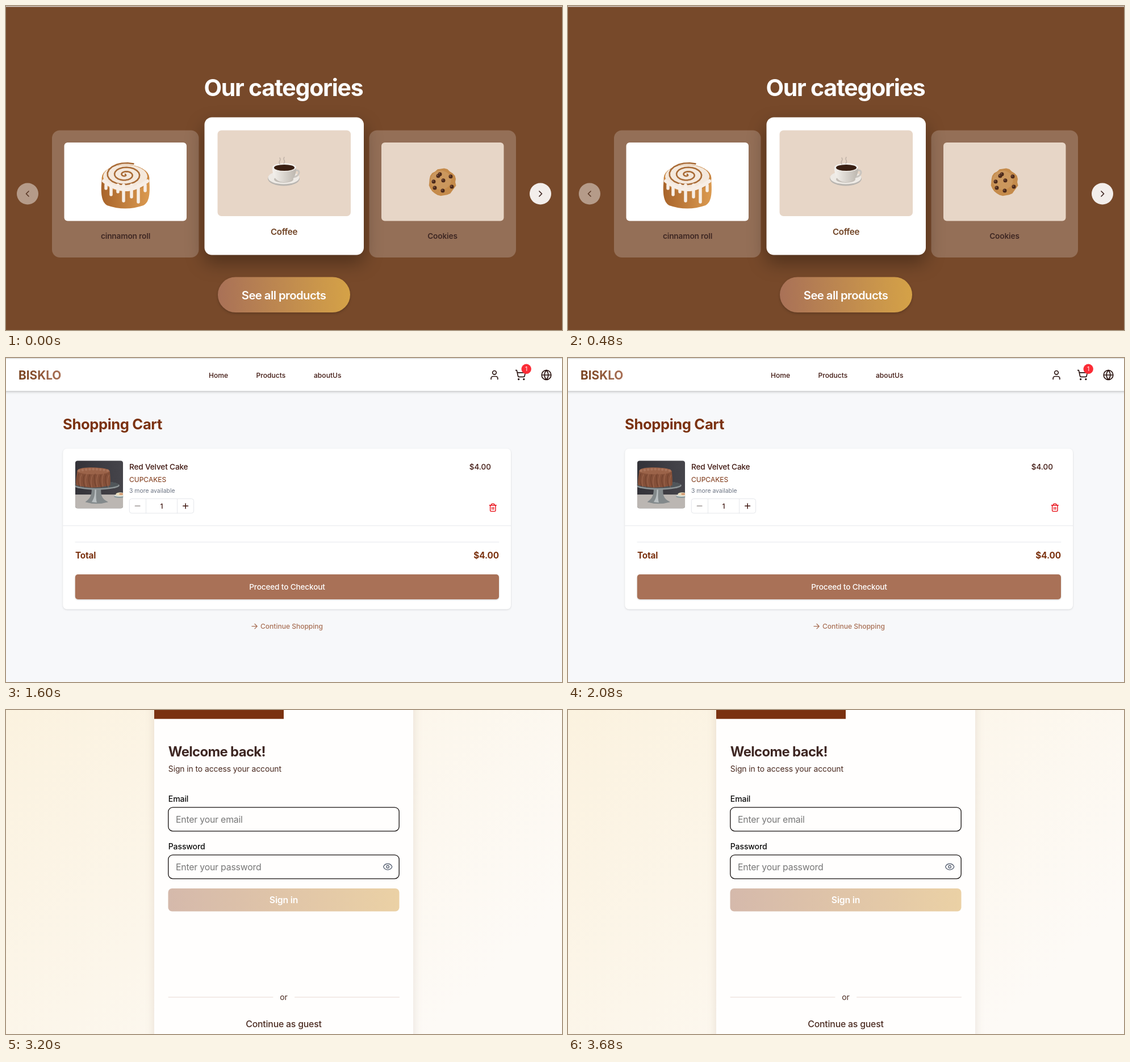
Recreate the animation shown at these times as an HTML page. Size 979 by 572 pixels, loop 4 s.

```html
<!DOCTYPE html>
<html lang="en">
<head>
<meta charset="utf-8">
<title>Bakery shop tour</title>
<style>
html,body{margin:0;width:100%;height:100%;overflow:hidden;background:#fff}
svg{display:block;width:100%;height:100%}
text{font-family:Inter,"DejaVu Sans",sans-serif;font-optical-sizing:none;white-space:pre}
.soft{filter:drop-shadow(0 2px 2px #0003)}
.card{filter:drop-shadow(0 4px 5px #0002)}
.deep{filter:drop-shadow(0 14px 16px #0005)}
.ic{fill:none;stroke-linecap:round;stroke-linejoin:round}
</style>
</head>
<body>
<svg id="stage" viewBox="0 0 979 572" preserveAspectRatio="none"></svg>
<script>
const HOLD = 800;
let seed = 7;
const rnd = () => (seed = (seed * 16807) % 2147483647) / 2147483647;
const span = (a, b) => a + (b - a) * rnd();
const n = v => +v.toFixed(2);
const times = (k, f) => Array.from({length: k}, (_, i) => f(i)).join('');

const rect = (x, y, w, h, r, fill, more = '') =>
  `<rect x="${x}" y="${y}" width="${w}" height="${h}" rx="${r}" fill="${fill}" ${more}/>`;
const oval = (x, y, rx, ry, fill, more = '') =>
  `<ellipse cx="${n(x)}" cy="${n(y)}" rx="${n(rx)}" ry="${n(ry)}" fill="${fill}" ${more}/>`;
const disc = (x, y, r, fill, more) => oval(x, y, r, r, fill, more);
const path = (d, fill, more = '') => `<path d="${d}" fill="${fill}" ${more}/>`;
const line = (d, stroke, w = 1, more = '') =>
  `<path class="ic" d="${d}" stroke="${stroke}" stroke-width="${w}" ${more}/>`;
const at = (x, y, body, k = 1) => `<g transform="translate(${x} ${y}) scale(${k})">${body}</g>`;
const box = (x, y, w, h, r, fill, stroke, sw = 1) =>
  rect(x, y, w, h, r, fill, `stroke="${stroke}" stroke-width="${sw}"`);
const text = (x, y, s, size, weight, fill, ls = -0.012, anchor = 'start', more = '') =>
  `<text x="${x}" y="${y}" font-size="${size}" font-weight="${weight}" fill="${fill}" ` +
  `letter-spacing="${n(ls * size)}" text-anchor="${anchor}" ${more}>${s}</text>`;
const mid = (x, y, s, size, weight, fill, ls) => text(x, y, s, size, weight, fill, ls, 'middle');
const end = (x, y, s, size, weight, fill, ls) => text(x, y, s, size, weight, fill, ls, 'end');
const grad = (id, a, b, more = '') =>
  `<linearGradient id="${id}" ${more}><stop stop-color="${a}"/><stop offset="1" stop-color="${b}"/></linearGradient>`;

const ring = (x, y, r) => `M${x - r} ${y}a${r} ${r} 0 1 0 ${2 * r} 0a${r} ${r} 0 1 0 ${-2 * r} 0`;
const ICONS = {
  user: 'M19 21v-2a4 4 0 0 0-4-4H9a4 4 0 0 0-4 4v2' + ring(12, 7, 4),
  cart: 'M2 2h2l2.7 12.4a2 2 0 0 0 2 1.6h9.8a2 2 0 0 0 2-1.6L22 7H5.1' + ring(8, 21, 1) + ring(19, 21, 1),
  globe: ring(12, 12, 10) + 'M12 2a14.5 14.5 0 0 0 0 20 14.5 14.5 0 0 0 0-20M2 12h20',
  trash: 'M3 6h18M19 6v14a2 2 0 0 1-2 2H7a2 2 0 0 1-2-2V6M8 6V4a2 2 0 0 1 2-2h4a2 2 0 0 1 2 2v2M10 11v6M14 11v6',
  eye: 'M2 12.3a1 1 0 0 1 0-.7 10.8 10.8 0 0 1 20 0 1 1 0 0 1 0 .7 10.8 10.8 0 0 1-20 0' + ring(12, 12, 3),
  search: ring(11, 11, 8) + 'M21 21l-4.3-4.3',
  cookie: 'M12 2a10 10 0 1 0 10 10 4 4 0 0 1-5-5 4 4 0 0 1-5-5M8.5 8.5v.01M16 15.5v.01M12 12v.01M11 17v.01M7 14v.01',
  truck: 'M14 18V6a2 2 0 0 0-2-2H4a2 2 0 0 0-2 2v11a1 1 0 0 0 1 1h2M15 18H9M19 18h2a1 1 0 0 0 1-1v-3.6a1 1 0 0 0-.2-.7l-3.5-4.3a1 1 0 0 0-.8-.4H14' + ring(17, 18, 2) + ring(7, 18, 2),
  star: 'M12 2l3.1 6.3 6.9 1-5 4.8 1.2 6.9L12 17.8 5.8 21 7 14.1 2 9.3l6.9-1z'
};
const icon = (name, x, y, size, color, sw = 2) =>
  at(n(x - size / 2), n(y - size / 2), line(ICONS[name], color, sw), size / 24);

// Irregular round biscuit with scattered chips
function cookie(x, y, r, fill, chip, chips = 12) {
  const edge = Array.from({length: 26}, (_, i) => {
    const a = i / 26 * 2 * Math.PI, d = r * span(.94, 1.04);
    return n(x + d * Math.cos(a)) + ' ' + n(y + d * Math.sin(a));
  });
  return path('M' + edge.join('L') + 'z', fill) +
    oval(x - r * .12, y - r * .15, r * .75, r * .7, '#fff', 'opacity=".1"') +
    times(chips, i => {
      const a = i * 2.4, d = r * .84 * Math.sqrt((i + .4) / chips);
      return oval(x + d * Math.cos(a), y + d * Math.sin(a), r * span(.07, .13), r * span(.06, .11), chip);
    });
}
const crumbs = (k, x, y, w, h, fill) =>
  times(k, () => oval(x + w * rnd(), y + h * rnd(), span(.8, 2.8), span(.7, 2.2), fill));

function bun() {
  let d = 'M210 297';
  for (let i = 1; i < 60; i++) {
    const a = i * .3, r = i * .6;
    d += `L${n(210 + r * Math.cos(a))} ${n(298 + r * .6 * Math.sin(a))}`;
  }
  const drips = [[176, 322], [185, 333], [197, 328], [207, 344], [221, 337], [233, 346], [245, 326]];
  return path('M169 304C166 330 168 346 178 352Q210 363 242 352C253 346 254 330 252 304z', 'url(#bun)') +
    oval(210.5, 304, 42, 24, '#c98540') + oval(210, 301, 39, 20.5, '#f4e8dc') +
    line(d, '#a96b36', 2.6) +
    line('M172 309Q210 339 249 309', '#f7eee6', 6) +
    drips.map(([x, y]) => line(`M${x} 316V${y}`, '#f7eee6', 5.5)).join('');
}
const cup = () =>
  oval(489, 305, 28, 12.5, '#b9b5b0') + oval(489, 303, 27.5, 11.5, '#eeeae5') +
  oval(489, 306, 17, 6, '#c3bdb6') +
  line('M508 291c11-5 11 10-2 11', '#c9c5bf', 3) +
  path('M469 285c0 18 8 26 21 26s21-8 21-26z', 'url(#china)') +
  oval(490, 285, 21, 7.5, '#f2efeb') + oval(490, 285.5, 18, 5.6, '#3a2013') +
  line('M482 279c-4-5 4-6 0-11M489 278c5-5-3-6 1-11', '#a59b92', 1.6, 'opacity=".55"');

function homePage() {
  const brown = '#3e2723';
  return rect(0, 0, 979, 572, 0, '#77492a') + rect(0, 0, 979, 1.5, 0, '#d8cfc9') +
    mid(488.5, 159, 'Our categories', 41, 700, '#fff', -.03) +
    [81, 639.5].map(x => rect(x, 219.5, 258.5, 224.5, 14, '#946f57')).join('') +
    rect(102.5, 241, 215.5, 138.5, 6, '#fff') + rect(661, 241, 215.5, 138.5, 6, '#e7d6c7') +
    bun() + cookie(768.5, 311, 24, '#c58b4b', '#8d5529', 0) +
    [[764, 297], [783, 301], [753, 310], [770, 308], [785, 319], [755, 321], [769, 326], [761, 300]]
      .map(([x, y]) => disc(x, y, 3.5, '#4d2a1b') + disc(x - 1, y - 1, 1.1, '#8a6250')).join('') +
    mid(210.5, 410.5, 'cinnamon roll', 13.7, 600, brown) + mid(768.5, 410.5, 'Cookies', 13.7, 600, brown) +
    rect(349.5, 196.5, 280.5, 243, 13, '#fff', 'class="deep"') +
    rect(372.5, 219.5, 234.5, 151.5, 7, '#e7d6c7') + cup() +
    mid(489.5, 403.5, 'Coffee', 15.1, 600, '#6f4223', -.02) +
    disc(38, 331.5, 19, '#b59b89') + line('M40 327l-4.5 4.5 4.5 4.5', '#5c3b29', 1.7) +
    disc(941, 331.5, 19, '#f3eeeb') + line('M939 327l4.5 4.5-4.5 4.5', brown, 1.7) +
    rect(373, 478.5, 233, 62.5, 31.2, 'url(#gold)', 'class="soft"') +
    mid(489, 517.5, 'See all products', 20.3, 600, '#fff', -.027);
}

// Photo scenes, drawn from their own top left corner
const cakePhoto = () =>
  rect(0, 0, 296, 296, 0, 'url(#dusk)') + rect(0, 210, 296, 86, 0, '#bbb6b2') +
  path('M102 170C104 225 84 240 62 256Q132 278 204 256C172 240 156 225 160 170z', '#83898b') +
  path('M122 178C122 225 112 240 102 256L134 260C126 230 130 200 130 178z', '#b9bfc1') +
  oval(132, 154, 142, 26, '#8e9597') + oval(132, 149, 136, 22, '#50565a') +
  path('M6 152C2 120 10 96 12 66Q24 44 112 43T214 66C217 96 220 130 216 154Q110 180 6 152z', '#855039') +
  path('M12 66Q30 84 112 85T214 66Q208 46 112 43T12 66z', '#9b6349') +
  times(12, i => line(`M${22 + i * 17} ${82 + i % 3 * 4}q-14 32 ${4 - i % 2 * 8} 76`, i % 2 ? '#ad745a' : '#633725', 4, 'opacity=".65"')) +
  times(9, i => disc(24 + i * 22, 62 - 9 * Math.sin(i * .39), 8, '#a9735a')) +
  oval(274, 222, 34, 9, '#85979b') + oval(274, 216, 32, 8, '#d9dbd6') +
  oval(278, 207, 27, 10, '#e8dcbb') + oval(284, 207, 12, 5, '#cf8c66');

const bowlPhoto = () =>
  rect(0, 0, 296, 167, 0, '#292b31') +
  path('M0 0H125Q70 60 88 167H0z', '#34373f') + line('M24 0Q70 60 24 167M62 0Q28 70 70 150', '#20232a', 9) +
  path('M150 0H296V110L230 60 120 64z', '#4a3a2d') + path('M140 0H282L240 48 176 46 132 28z', '#a48a6d') +
  line('M142 4Q84 46 76 100', '#765036', 6) +
  path('M40 112L108 62 94 112 118 167H78L72 130z', '#b79a7b') + path('M92 90L126 44 142 76 116 150z', '#8a6d50') +
  cookie(268, 112, 38, '#6d4329', '#472a1c', 7) + cookie(220, 72, 40, '#a97044', '#2d1d17', 14) +
  cookie(170, 88, 46, '#b98354', '#2d1d17', 15) + cookie(196, 128, 40, '#bd8858', '#2d1d17', 14) +
  cookie(146, 140, 36, '#ab7344', '#2d1d17', 14);

const chipPhoto = () =>
  rect(0, 0, 296, 167, 0, 'url(#steel)') + line('M150 0Q190 60 296 44M220 167L250 100', '#a9b1bb', 3) +
  cookie(24, 12, 38, '#a8794e', '#4a2b1c', 16) + cookie(300, 66, 26, '#74513a', '#332019', 10) +
  cookie(108, 66, 52, '#b38862', '#432517', 22) + cookie(88, 124, 46, '#a97b53', '#4d2d1d', 18) +
  cookie(184, 110, 40, '#b0825a', '#3a2117', 18) +
  path('M76 18L108 36 126 72 144 62 130 40 100 24z', '#3a2019') +
  disc(96, 66, 8, '#d9d3cf') + path('M150 130L164 100 176 142 160 160z', '#38221a') +
  crumbs(20, 10, 60, 270, 100, '#5d402d');

const boxPhoto = () =>
  rect(0, 0, 296, 70, 0, '#ddd0cf') + path('M0 0H108L152 70H0z', '#191514') +
  path('M104 0H121L164 70H144z', '#58b9b1') +
  disc(26, 12, 24, '#3a2a24') + crumbs(24, 6, 0, 38, 30, '#a99a8d') +
  disc(62, 64, 22, '#0d0b0b') + disc(94, 32, 30, '#382219') + disc(94, 32, 21, '#8a5735') +
  line(ring(94, 32, 15) + ring(88, 28, 6) + ring(100, 36, 6), '#d6ae74', 1.7) +
  cookie(177, 30, 31, '#3c2218', '#24140f', 6) + disc(177, 29, 20, '#955d3c') + disc(174, 26, 8, '#b07b57') +
  crumbs(46, 130, 2, 160, 62, '#71503f');

const shardPhoto = () =>
  rect(0, 0, 296, 70, 0, '#241916') +
  times(26, i => {
    const x = i % 9 * 36 + span(-18, 8), y = Math.floor(i / 9) * 25 + span(-14, 4), w = span(34, 64);
    return path(`M${n(x)} ${n(y + 18)}L${n(x + w)} ${n(y - 8)}l9 12L${n(x + 12)} ${n(y + 36)}z`, ['#45302a', '#5d453b', '#34231e', '#765d50'][i % 4]);
  });

const trufflePhoto = () =>
  rect(0, 0, 296, 70, 0, '#8b8076') +
  [[18, 8, 30], [82, 10, 27], [152, 8, 28], [222, 10, 26], [284, 12, 24], [50, 46, 29], [118, 40, 30], [202, 34, 28], [254, 54, 30], [14, 66, 28], [172, 70, 25]]
    .map(([x, y, r]) => disc(x + 2, y + 4, r, '#2e1b13') + disc(x, y, r, '#603825') +
      oval(x - r * .15, y - r * .25, r * .65, r * .5, '#8d5b40') + oval(x + r * .2, y - r * .4, r * .25, r * .14, '#bd9275')).join('') +
  crumbs(40, 0, 0, 296, 66, '#321e16');

function product(x, scene, title, lines, price) {
  const y = lines.length > 1 ? 437 : 420;
  return rect(x, 177, 295.5, 309.5, 13, '#fff', 'class="card"') +
    at(x, 177, `<g clip-path="url(#top)">${scene}</g>`) +
    text(x + 17.5, 378.5, title, 15.3, 600, '#0a0a0a', -.014) +
    lines.map((s, i) => text(x + 17.5, 405.3 + i * 17.5, s, 11.9, 400, '#4b5563', -.004)).join('') +
    text(x + 17.5, y + 22.3, price, 17, 700, '#000') +
    rect(x + 190, y, 88, 31, 6, '#d6a149') +
    mid(x + 234, y + 19.3, 'إضافة للسلة', 12, 500, '#fff', 0);
}
function shopPage() {
  return rect(0, 0, 979, 572, 0, '#fff') + rect(-9, -9, 997, 16.5, 0, '#fff', 'class="soft"') +
    box(47.3, 70, 445, 42.8, 6, '#fff', '#d1d5db') + icon('search', 66, 91.5, 18, '#99a1af') +
    text(82, 96.7, 'Search products...', 13.6, 400, '#777', -.01) +
    box(641.5, 71, 296.5, 40.5, 6, '#fff', '#d1d5db') +
    text(659, 96.7, 'All Categories', 13.6, 400, '#000', -.01) + line('M927.3 90l3.4 3.3 3.4-3.3', '#111', 1.5) +
    product(27, at(0, -65, cakePhoto()), 'Red Velvet Cake', ['Moist red velvet cake with cream cheese', 'frosting'], '$4.00') +
    product(345, bowlPhoto(), 'Oatmeal Raisin Cookies', ['Traditional oatmeal cookies with plump raisins'], '$11.99') +
    product(663, chipPhoto(), 'Chocolate Chip Cookies', ['Classic homemade chocolate chip cookies,', 'soft and chewy'], '$12.99') +
    [boxPhoto, shardPhoto, trufflePhoto].map((f, i) => at(27 + i * 318, 508.5, `<g clip-path="url(#top)">${f()}</g>`)).join('');
}

function cartPage() {
  const rust = '#7b3210', dark = '#3f1710';
  return rect(0, 0, 979, 572, 0, '#f7f8fa') + rect(-9, -9, 997, 67, 0, '#fff', 'class="soft"') +
    rect(0, 0, 979, 1.5, 0, '#dcdddd') +
    text(22, 38, 'BISKLO', 20.8, 700, 'url(#brand)', 0) +
    text(357, 34.6, 'Home', 12.1, 500, dark, 0) + text(440.5, 34.6, 'Products', 12.1, 500, dark, 0) +
    text(542, 34.6, 'aboutUs', 12.1, 500, dark, 0) +
    icon('user', 860, 30, 20, '#2b1512') + icon('cart', 906, 30, 20, '#2b1512') + icon('globe', 951.5, 30, 20, '#2b1512') +
    disc(916.2, 19.3, 8.7, '#fb2c36') + mid(916.2, 23.2, '1', 10.4, 400, '#fff', 0) +
    text(100, 126, 'Shopping Cart', 25.6, 700, rust, -.015) +
    rect(100.3, 160, 788.7, 283.5, 7, '#fff', 'class="soft" style="filter:drop-shadow(0 1px 1.5px #0002)"') +
    at(121.8, 181.2, `<g clip-path="url(#thumb)">${cakePhoto()}</g>`, .285) +
    text(217, 197, 'Red Velvet Cake', 13.6, 500, dark) +
    text(217, 219.2, 'CUPCAKES', 12, 400, rust, 0) +
    text(217, 238, '3 more available', 10.4, 400, '#6a7282', 0) +
    box(217.3, 248.5, 113.3, 25.5, 4, '#fff', '#e5e7eb') + line('M246.5 248.5v25.5M301.5 248.5v25.5', '#e5e7eb') +
    line('M227.3 261.3h8.6', '#9d9694', 1.4) + line('M311.7 261.3h8.8M316.1 256.9v8.8', dark, 1.5) +
    mid(274, 265.8, '1', 12.2, 500, dark, 0) +
    end(854, 197, '$4.00', 13.5, 500, dark, 0) + icon('trash', 857.3, 264, 16, '#e7000b') +
    line('M100.5 296h788.3M122 325h746', '#e5e7eb') +
    text(122, 354, 'Total', 15.3, 700, rust) + end(868, 354, '$4.00', 15.3, 700, rust, -.005) +
    rect(121.8, 382, 746.2, 44, 5, '#a97157', 'class="soft" style="filter:drop-shadow(0 1px 1px #0003)"') +
    mid(495, 409.2, 'Proceed to Checkout', 13.6, 500, '#fff') +
    line('M433 473.7h9M438 469.5l4.2 4.2-4.2 4.2', '#a97157', 1.3) +
    text(448, 478, 'Continue Shopping', 12.1, 500, '#a97157', -.003);
}

function heroPage() {
  const mug = (x, y) => path(`M${x - 46} ${y - 42}h90l-12 72q-33 24-66 0z`, '#ecd9c3') +
    oval(x, y - 42, 44, 9, '#e7d1ba') + line(`M${x + 38} ${y - 30}q34 0 28 24-8 20-36 18`, '#f0e0cb', 9) + disc(x - 4, y + 4, 13, '#dfc6ae');
  const faint = (x, y) => disc(x, y, 50, '#f5ead6') +
    times(8, i => disc(x + 28 * Math.cos(i * .8), y + 26 * Math.sin(i * .8), 8, '#f0e1cb'));
  const round = (x, y) => disc(x, y, 51, '#ecd9c3') +
    times(6, i => disc(x + 30 * Math.cos(i * 1.1), y + 28 * Math.sin(i * 1.1), 7, '#e7d2ba'));
  const badge = (x, name, s) => disc(x, 515, 29, 'url(#cream)', 'class="soft"') +
    icon(name, x, 515, 27, '#6d3f20') + mid(x, 571, s, 14, 500, '#3e2723', -.006);
  return rect(0, 0, 979, 572, 0, '#f9f1e0') +
    '<g filter="url(#haze)">' +
    [[14, 48], [420, 46], [176, 212], [905, 376], [752, 376], [960, 212]].map(p => faint(...p)).join('') +
    [[583, 46], [910, 46], [14, 212], [828, 212], [90, 374], [255, 374], [14, 537], [828, 537]].map(p => round(...p)).join('') +
    disc(747, 50, 50, '#f0e0cb') + disc(758, 30, 26, '#ead7c0') + mug(174, 62) + mug(174, 554) + '</g>' +
    rect(228.5, 89.5, 522, 520, 23, '#fefcfa', 'stroke="#efe3d0" style="filter:drop-shadow(0 6px 12px #8a5a2a22)"') +
    mid(489, 180, 'Enjoy', 48, 800, '#3e2723', -.05) +
    mid(489, 240.5, 'Sweet Moments', 48, 700, 'url(#gold)', -.046) +
    mid(489.5, 302, 'Coffee, cookies, and more', 19.4, 400, '#5a372c', -.021) +
    mid(489.5, 335, 'Delivered to your doorstep', 19.4, 400, '#5a372c', -.021) +
    rect(397.5, 384.8, 184, 60.7, 30.3, 'url(#shop)', 'class="soft"') +
    mid(489.5, 421.5, 'Shop Now', 17.8, 600, '#fff', -.018) +
    badge(334.5, 'cookie', 'Fresh Baked Goods') + badge(489.5, 'truck', 'Fast Delivery') + badge(644.5, 'star', 'Premium Quality');
}

function loginPage() {
  const ink = '#4a2a20';
  return rect(0, 0, 979, 572, 0, 'url(#dawn)') +
    rect(261, -40, 456, 660, 0, '#fffefd', 'style="filter:drop-shadow(0 2px 8px #5a3a2a22)"') +
    rect(261, -1, 228, 16.7, 0, '#7a3110') +
    text(285.8, 82, 'Welcome back!', 23.8, 700, '#3e2723', -.026) +
    text(285.8, 108.7, 'Sign in to access your account', 13.9, 400, ink, -.006) +
    text(285.8, 162, 'Email', 14, 500, '#0a0a0a', -.005) + text(285.8, 245.8, 'Password', 14, 500, '#0a0a0a', -.008) +
    box(285.8, 171.8, 406.4, 42, 8, '#fffefd', '#15100f', 1.3) + box(285.8, 255.8, 406.4, 42, 8, '#fffefd', '#15100f', 1.3) +
    text(299, 199, 'Enter your email', 15.8, 400, '#777') + text(299, 283, 'Enter your password', 15.8, 400, '#777') +
    icon('eye', 672.2, 276.8, 18, '#5b6475', 1.8) +
    rect(285.5, 315, 407, 40.5, 7, 'url(#pale)') + mid(489, 341.3, 'Sign in', 15.8, 600, '#fff') +
    line('M286 507h184M508.5 507h184', '#e8d8d2') + mid(489, 512, 'or', 14, 400, ink, 0) +
    mid(489, 559.8, 'Continue as guest', 15.8, 500, ink);
}

const defs = '<defs>' +
  grad('gold', '#a97157', '#d5a247') + grad('shop', '#a97157', '#c18d52') + grad('pale', '#d5b9ab', '#ebd1a5') +
  grad('brand', '#77401c', '#a97157') + grad('bun', '#a8642b', '#db9a50') + grad('china', '#f5f2ee', '#bcb6ae') +
  grad('dusk', '#333238', '#46454b') + grad('steel', '#c6cad2', '#b3bac5') + grad('cream', '#faf1df', '#fdfaf4') +
  grad('dawn', '#fbf2df', '#fdfaf6', 'x2="1" y2=".6"') +
  '<filter id="haze"><feGaussianBlur stdDeviation="4.5"/></filter>' +
  '<clipPath id="top"><path d="M0 166.5V13a13 13 0 0 1 13-13H282.5a13 13 0 0 1 13 13V166.5z"/></clipPath>' +
  '<clipPath id="thumb"><rect width="296" height="296" rx="16"/></clipPath></defs>';

const stage = document.getElementById('stage');
const pages = [homePage, shopPage, cartPage, heroPage, loginPage];
stage.innerHTML = defs + pages.map(f => `<g class="page" display="none">${f()}</g>`).join('');
const views = [...stage.querySelectorAll('.page')];

let shown = -1;
function show(t) {
  const i = Math.floor(t / HOLD) % views.length;
  if (i === shown) return;
  shown = i;
  views.forEach((v, k) => v.setAttribute('display', k === i ? 'inline' : 'none'));
}
const start = performance.now();
function tick() {
  show(performance.now() - start);
  requestAnimationFrame(tick);
}
tick();
</script>
</body>
</html>
```
